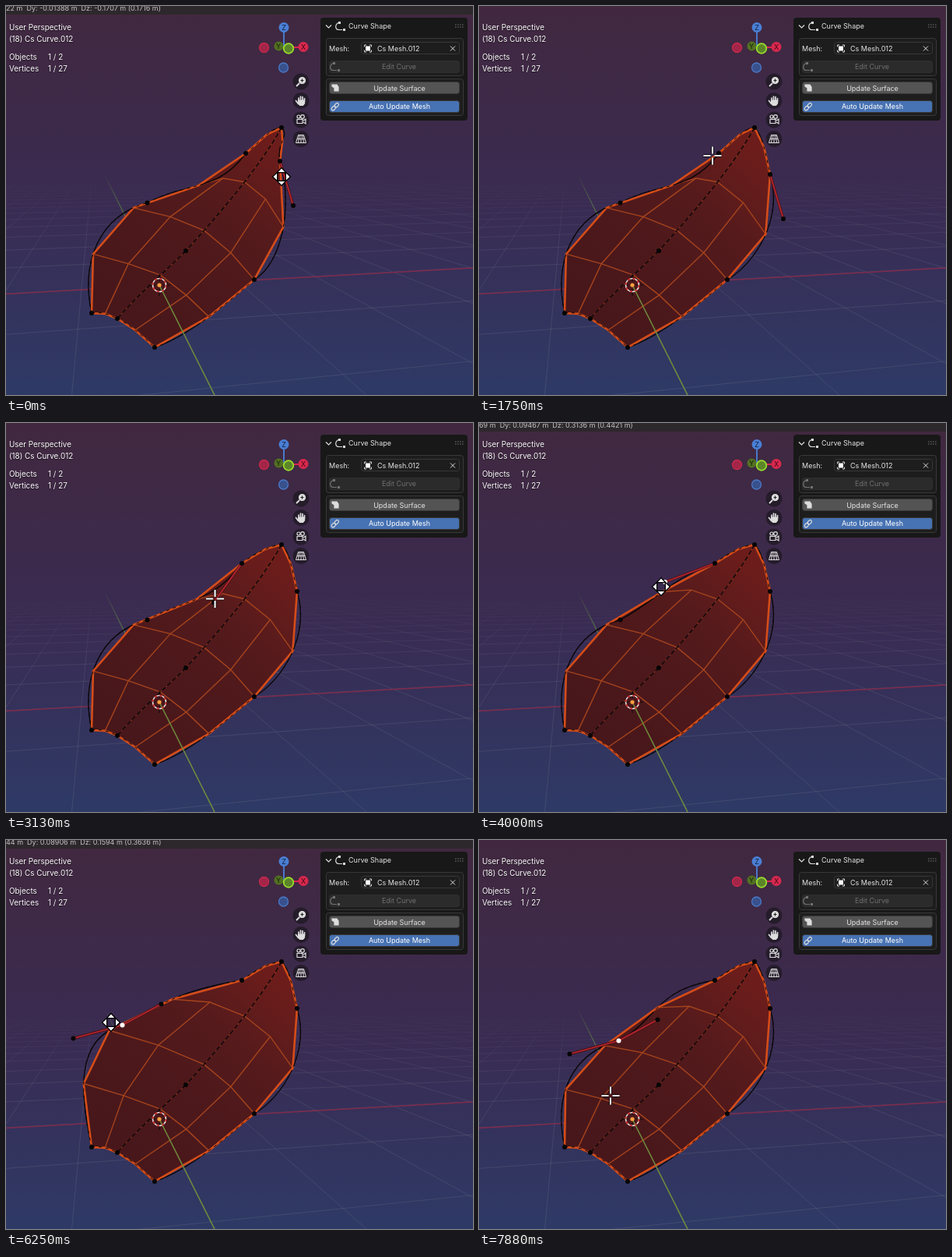
An HTML page with a canvas that plays this animation: 600x499 px, repeating every 8 s.

```html
<!DOCTYPE html>
<html lang="en">
<head>
<meta charset="utf-8">
<title>Curve Shape</title>
<style>
  html, body { margin: 0; width: 100%; height: 100%; overflow: hidden; background: #3a2b50; }
  canvas, svg { position: absolute; left: 0; top: 0; }
  text { font: 9px Inter, sans-serif; fill: #e4e4e4; }
  .view text { font-size: 9.9px; fill: #fff; text-shadow: 0 1px 1px #000a; }
  .mid { text-anchor: middle; }
  #status text { fill: #c4c0c2; white-space: pre; }
</style>
</head>
<body>
<canvas id="scene" width="600" height="499"></canvas>
<svg width="600" height="499" viewBox="0 0 600 499">
  <g id="status">
    <rect width="600" height="11" fill="#2c292b" opacity=".9"/>
    <text id="delta" y="6"></text>
  </g>
  <g class="view">
    <text x="4" y="31">User Perspective</text>
    <text x="4" y="46">(18) Cs Curve.012</text>
    <text x="4" y="69">Objects</text><text x="54" y="69">1 / 2</text>
    <text x="4" y="84">Vertices</text><text x="54" y="84">1 / 27</text>
  </g>

  <g stroke-width="2">
    <path d="M357 53V28" stroke="#4a78c8"/>
    <path d="M357 53H382" stroke="#d8264c"/>
    <circle cx="357" cy="27.5" r="6.5" fill="#4a7fd4"/>
    <circle cx="382" cy="52.5" r="6.5" fill="#d8284e"/>
    <g stroke-width="1.3">
      <circle cx="331.5" cy="53.5" r="6" fill="#a32549" stroke="#c92a4c"/>
      <circle cx="356.5" cy="79" r="6" fill="#39518c" stroke="#4a78c8"/>
      <circle cx="350.5" cy="51.5" r="6" fill="#527022"/>
      <circle cx="363" cy="54.5" r="6.3" fill="#5c852a" stroke="#9bdc2c" stroke-width="1.8"/>
    </g>
    <g class="mid">
      <text x="357" y="31" style="fill:#10203c">Z</text>
      <text x="382" y="56" style="fill:#3c0814">X</text>
      <text x="350" y="55" style="fill:#17200a">Y</text>
    </g>
  </g>

  <g fill="#211a26" opacity=".85">
    <circle cx="379" cy="97" r="10.5"/><circle cx="379" cy="121.5" r="10.5"/>
    <circle cx="379" cy="146" r="10.5"/><circle cx="379" cy="170.5" r="10.5"/>
  </g>
  <g fill="none" stroke="#ddd" stroke-width="1.2">
    <circle cx="380.5" cy="95.5" r="4" fill="#ddd"/>
    <path d="M377 99l-4 4" stroke-width="2"/>
    <path d="M378.5 95.5h4m-2-2v4" stroke="#222"/>
    <path d="M376 123v-5m2.5 4v-6m2.5 6v-5.5m2.5 6v-4m-11 3l3 4" stroke-width="1.7" stroke-linecap="round"/>
    <path d="M375.5 121h8v4l-2 2.5h-4l-2-3z" fill="#ddd"/>
    <circle cx="376" cy="142" r="2"/><circle cx="381" cy="142" r="2.3"/>
    <path d="M374 145.500h7v5h-7zM382 147l3-2v6l-3-2"/>
    <path d="M375.5 165.5h7l3 10h-13zM374 170.5h10M379 165.5v10M377 165.5l-1.5 10M381 165.5l1.5 10" stroke-width="1"/>
  </g>

  <rect x="404" y="15" width="189" height="132" rx="4" fill="#181818"/>
  <g fill="#1d1d1d" stroke="#383838">
    <rect x="411.5" y="41.5" width="176" height="48" rx="3"/>
    <rect x="411.5" y="93.5" width="176" height="47" rx="3"/>
    <rect x="456.5" y="46.5" width="126" height="15" rx="3"/>
    <rect x="415.5" y="70.5" width="167" height="15" rx="3" fill="#2b2b2b" stroke="#2f2f2f"/>
    <rect x="415.5" y="97.5" width="167" height="15" rx="3" fill="#545454"/>
    <rect x="415.5" y="121.5" width="167" height="15" rx="3" fill="#4772b3"/>
  </g>
  <g fill="none" stroke="#ddd" stroke-width="1.2">
    <path d="M411 24.5l3.500 3.500 3.500-3.500"/>
    <path id="curve" d="M427 21.500c-5 3-4 9 1 9h4"/>
    <path id="nodes" d="M427 20h3v3h-3zM433 29h3v3h-3z" fill="#ddd" stroke="none"/>
    <g opacity=".4"><use href="#curve" x="-7" y="52"/><use href="#nodes" x="-7" y="52"/></g>
    <path d="M571 51.500l6 6m0-6l-6 6" stroke-width="1"/>
    <path d="M460.500 52.500v-2.500h2.500m4 0h2.500v2.500m0 4v2.500h-2.500m-4 0h-2.500v-2.500" stroke-width="1"/>
    <path d="M462 51.500h6v6h-6z" fill="#fff" stroke="none"/>
    <path d="M419 101h6l2 3v5h-5v-4l-3-2z" fill="#ddd"/>
    <g transform="rotate(-45 423 129)"><rect x="417" y="127" width="6" height="4" rx="2"/><rect x="422.500" y="127" width="6" height="4" rx="2"/></g>
    <path d="M577 24h11m-11 3h11" stroke="#777" stroke-dasharray="1.5 1.5"/>
  </g>
  <text x="440" y="29">Curve Shape</text>
  <text x="415" y="57.5">Mesh:</text>
  <text x="477" y="57.5">Cs Mesh.012</text>
  <g class="mid">
    <text x="505" y="81" style="fill:#707070">Edit Curve</text>
    <text x="505.5" y="108.5">Update Surface</text>
    <text x="505.5" y="132" style="fill:#fff">Auto Update Mesh</text>
  </g>
</svg>
<script>
const ctx = document.getElementById("scene").getContext("2d");
const status = document.getElementById("status");
const delta = document.getElementById("delta");
const LOOP = 8000, STEP = 125;

// Cursor stops: [time, x, y], eased in between
const stops = [[0, 354, 219], [800, 376, 236], [1000, 376, 236], [1750, 300, 192], [1875, 300, 192],
  [2500, 295, 183], [3375, 262, 236], [4375, 221, 198], [4625, 221, 198], [5250, 171, 251],
  [5500, 167, 249], [6250, 135, 234], [6750, 176, 266], [7125, 165, 254], [7875, 169, 328]];

// Each drag moves one control point along with the cursor
const drags = {
  right: { start: 0, end: 1000, grab: [358.754, 208.351], offset: [-2, -20] },
  top: { start: 1875, end: 2500, grab: [300, 192], offset: [8, -3] },
  topHandle: { start: 3375, end: 4625, grab: [262, 236], offset: [5, -6] },
  left: { start: 5500, end: 7125, grab: [171, 251], offset: [14.5, 3.5] }
};
const TIP = [354, 156], ORIGIN = [197, 358], CENTER = [231, 314], SIDE = [319, 351];
const BASE = [[110, 394], [143, 401], [191, 438]];

const add = (p, d) => [p[0] + d[0], p[1] + d[1]];
const sub = (p, q) => [p[0] - q[0], p[1] - q[1]];
const mix = (p, q, u) => p.map((v, i) => v + (q[i] - v) * u);

function bezier(points, u) {
  if (points.length === 1) return points[0];
  return bezier(points.slice(1).map((p, i) => mix(points[i], p, u)), u);
}

function cursorAt(t) {
  const next = stops.findIndex(s => s[0] > t);
  if (next < 0) return stops.at(-1).slice(1);
  const [a, b] = [stops[next - 1], stops[next]];
  const u = (t - a[0]) / (b[0] - a[0]);
  return mix(a.slice(1), b.slice(1), u * u * (3 - 2 * u));
}

function dragged(name, t) {
  const { start, end, offset } = drags[name];
  return add(cursorAt(Math.min(Math.max(t, start), end)), offset);
}

function makeSplines(t) {
  const right = dragged("right", t), top = dragged("top", t), left = dragged("left", t);
  const rightHandle = add(right, [17, 57]);
  const topHandle = add(top, sub(dragged("topHandle", t), dragged("top", LOOP)));
  const leftIn = add(left, [-63, 17]), leftOut = add(left, [50, -27]);
  return {
    right, top, left, rightHandle, topHandle, leftIn, leftOut,
    leftLow: [BASE[0], [96, 330], leftIn, left],
    leftHigh: [left, leftOut, topHandle, top],
    crest: [top, add(top, [15, -11]), [338, 157], TIP],
    rightHigh: [TIP, [365, 166], add(right, [-5, -22]), right],
    rightMid: [right, rightHandle, [355, 330], SIDE],
    rightLow: [SIDE, [287, 378], [238, 422], BASE[2]],
    baseLeft: [BASE[0], [122, 392], [133, 396], BASE[1]],
    baseRight: [BASE[1], [158, 408], [173, 421], BASE[2]],
    spineHigh: [TIP, [325, 208], [273, 268], CENTER],
    spineLow: [CENTER, [202, 343], [175, 365], BASE[1]]
  };
}

// Rows of five vertices, sampled from the splines and slightly arched
function makeRows(s) {
  const row = (left, center, right, lift) => {
    const arch = [2, -lift];
    return [left, add(mix(left, center, .5), arch), center, add(mix(center, right, .5), arch), right];
  };
  return [
    row(bezier(s.leftHigh, .48), bezier(s.spineHigh, .43), bezier(s.rightMid, .47), 7),
    row(bezier(s.leftLow, .9), bezier(s.spineHigh, .82), SIDE, 3),
    row(bezier(s.leftLow, .42), bezier(s.spineLow, .38), bezier(s.rightLow, .5), 1),
    [BASE[0], bezier(s.baseLeft, .5), BASE[1], bezier(s.baseRight, .5), BASE[2]]
  ];
}

function stroke(color, width, dash = []) {
  ctx.strokeStyle = color;
  ctx.lineWidth = width;
  ctx.setLineDash(dash);
  ctx.stroke();
  ctx.setLineDash([]);
}

function poly(points, color, width) {
  ctx.beginPath();
  points.forEach(p => ctx.lineTo(...p));
  if (color) stroke(color, width);
}

function curves(list, color, width, dash) {
  ctx.beginPath();
  for (const [p, ...controls] of list) {
    ctx.moveTo(...p);
    ctx.bezierCurveTo(...controls.flat());
  }
  stroke(color, width, dash);
}

function dot(p, color = "#050505", r = 3) {
  ctx.beginPath();
  ctx.arc(...p, r, 0, 7);
  ctx.fillStyle = color;
  ctx.fill();
}

function gradient(x0, y0, x1, y1, ...colors) {
  const g = ctx.createLinearGradient(x0, y0, x1, y1);
  colors.forEach((c, i) => g.addColorStop(i / (colors.length - 1), c));
  return g;
}

function drawFloor() {
  ctx.fillStyle = gradient(0, 0, 0, 499, "#41283f", "#3a2b52", "#2e3a66");
  ctx.fillRect(0, 0, 600, 499);
  const horizon = 190, vanish = [113, horizon];
  const fade = gradient(0, 220, 0, 400, "#80849000", "#80849030", "#80849038");
  for (let k = -14; k < 24; k++) {
    poly([vanish, mix(vanish, [197 + 100 * k, 358 - 5.6 * k], 6)], fade, 1);
  }
  for (let k = -3; k < 16; k++) {
    const h = 168 / (1 + .22 * k), x = 113 + h / 2, slope = -h / (3200 - x);
    poly([[0, horizon + h - slope * x], [600, horizon + h + slope * (600 - x)]], fade, 1);
  }
  poly([[0, 369.5], [600, 336]], "#7e2b4c", 1.4);
  poly([[127, 217], ORIGIN], gradient(0, 215, 0, 270, "#54704400", "#547044"), 1.4);
}

function drawLeaf(s) {
  const rows = makeRows(s);
  const outline = [TIP, bezier(s.crest, .6), s.top, ...rows.map(r => r[0]), ...rows[3].slice(1),
    ...rows.slice(0, 3).reverse().map(r => r[4]), s.right, bezier(s.rightHigh, .5)];
  const spine = [s.spineHigh, s.spineLow];
  const border = [s.leftLow, s.leftHigh, s.crest, s.rightHigh, s.rightMid, s.rightLow, s.baseLeft, s.baseRight];

  poly(outline);
  ctx.closePath();
  ctx.fillStyle = gradient(140, 400, 345, 180, "#47171b", "#4c181b", "#541a1c", "#6c1d1b");
  ctx.fill();
  rows.slice(0, 3).forEach(r => poly(r, "#a5431d", 1.4));
  for (const c of [1, 3]) poly(rows.map(r => r[c]), "#a5431d", 1.4);
  curves(spine, "#8a3318", 1);
  curves(spine, "#0a0607", 1.4, [6, 3]);

  curves(border, "#0a0607", 1.3);
  poly([...outline, TIP], "#d54c18", 2.6);
  curves(border, "#0a0607", 1, [4, 5]);
}

function drawHandle(from, to, color) {
  poly([from, to], "#4a1018", 3.4);
  poly([from, to], "#b8262c", 1.7);
  dot(to, color);
}

function drawOrigin() {
  const [x, y] = ORIGIN;
  poly([ORIGIN, [268, 499]], "#6f8a3c", 1.6);
  ctx.beginPath();
  for (const [a, b] of [[1, 0], [-1, 0], [0, 1], [0, -1]]) {
    ctx.moveTo(x + 5 * a, y + 5 * b);
    ctx.lineTo(x + 14 * a, y + 14 * b);
  }
  stroke("#120a0a", 1.1);
  ctx.beginPath();
  ctx.arc(x, y, 8.5, 0, 7);
  stroke("#e8e4e4", 1.6);
  stroke("#d02424", 1.6, [3.34, 3.34]);
  dot(ORIGIN, "#ffa040", 2.6);
}

function drawCursor([x, y], dragging) {
  ctx.save();
  ctx.translate(x, y);
  ctx.beginPath();
  for (let i = 0; i < 4; i++) {
    ctx.rotate(Math.PI / 2);
    if (dragging) {
      ctx.moveTo(10.5, 0);
      ctx.lineTo(6, -4.2);
      ctx.lineTo(6, 4.2);
      ctx.closePath();
    } else {
      ctx.moveTo(2.5, 0);
      ctx.lineTo(11.5, 0);
    }
  }
  stroke("#000", dragging ? 2.6 : 3.6);
  if (dragging) {
    ctx.fillStyle = "#fff";
    ctx.fill();
  } else {
    stroke("#fff", 2.1);
  }
  ctx.restore();
}

// Screen movement to world units
function showDelta([dx, dy]) {
  const d = [.00680193 * dx + .00409002 * dy, -.00153495 * dx - .00198835 * dy, .00259495 * dx - .01487165 * dy];
  const [x, y, z, length] = [...d, Math.hypot(...d)].map(v => +v.toPrecision(4));
  delta.textContent = `${String(x).slice(-2)} m  Dy: ${y} m  Dz: ${z} m (${length} m)`;
}

function draw(now) {
  const t = Math.floor(now % LOOP / STEP) * STEP;
  const cursor = cursorAt(t), s = makeSplines(t);
  const drag = Object.values(drags).find(d => t >= d.start && t < d.end);

  drawFloor();
  drawLeaf(s);
  drawOrigin();
  if (t < drags.top.start) {
    drawHandle(s.right, s.rightHandle);
  } else if (t < drags.left.start) {
    drawHandle(s.top, s.topHandle, t < drags.topHandle.start ? undefined : "#fff");
  } else {
    drawHandle(s.left, s.leftIn);
    drawHandle(s.left, s.leftOut);
  }
  [TIP, CENTER, SIDE, ...BASE, s.top, s.right].forEach(p => dot(p));
  dot(s.left, t < drags.left.start ? undefined : "#fff");
  drawCursor(cursor, drag);

  status.style.display = drag ? "" : "none";
  if (drag) showDelta(sub(cursor, drag.grab));
  requestAnimationFrame(() => draw(performance.now() - begin));
}

const begin = performance.now();
draw(0);
</script>
</body>
</html>
```
